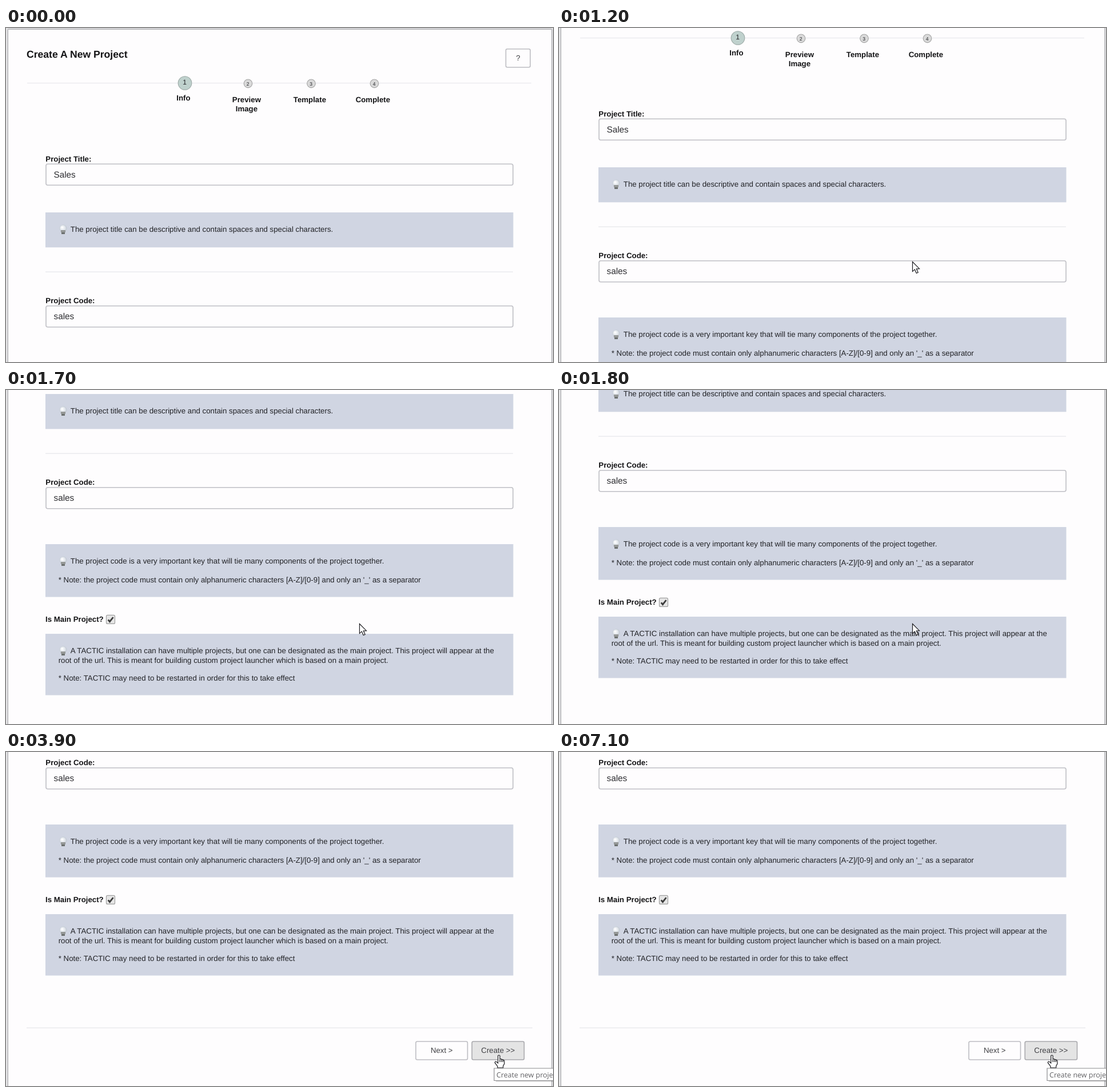
Recreate the animation shown at these times as an HTML page with a canvas. Size 957 by 585 pixels, loop 7200 ms.

```html
<!DOCTYPE html>
<html lang="en">
<head>
<meta charset="utf-8">
<title>Create A New Project</title>
<style>
  html, body { margin: 0; width: 100%; height: 100%; overflow: hidden; background: #fefdfe; }
  canvas { display: block; }
</style>
</head>
<body>
<canvas id="stage" width="957" height="585"></canvas>
<script>
const ctx = document.getElementById('stage').getContext('2d');
const W = 957, H = 585, LOOP = 7200, TICK = 100;
const SANS = '"Liberation Sans", Arial, sans-serif';
const BODY = 13.28;
const INK = '#222327', DARK = '#141416', PAPER = '#fefdfe', PANEL = '#d0d5e2', RULE = '#ebebef';

const ENTRY = { x: 936, y: 566 }, REST = { x: 618.5, y: 409.5 };
const BEND = { x: 745.5, y: 491.5 }, CREATE = { x: 862.5, y: 531 };

const span = (t, from, to) => Math.min(1, Math.max(0, (t - from) / (to - from)));
const smooth = k => k * k * (3 - 2 * k);
const easeOut = k => 1 - (1 - k) ** 2;
const mix = (a, b, k) => ({ x: a.x + (b.x - a.x) * k, y: a.y + (b.y - a.y) * k });

// Four turns of the wheel, each gliding about 115 px
function scrollAt(t) {
  const glide = (from, to, px) => px * smooth(span(t, from, to));
  return Math.round(glide(930, 1360, 115) + glide(1200, 1400, 116) +
    glide(1500, 1800, 115) + glide(1800, 2000, 113));
}

// Sweep in and rest, then a shallow curve down to the Create button
function pointerAt(t) {
  if (t < 2200) return mix(ENTRY, REST, easeOut(span(t, 100, 700)));
  const k = span(t, 2200, 3000);
  return mix(mix(REST, BEND, k), mix(BEND, CREATE, k), k);
}

function hoverAt({ x, y }) {
  if (y < 507 || y > 539) return '';
  if (x >= 815 && x <= 907) return 'create';
  return x >= 717 && x <= 808 ? 'next' : '';
}

function text(str, x, y, { size = BODY, bold = false, color = INK, align = 'left', family = SANS } = {}) {
  ctx.font = `${bold ? 'bold ' : ''}${size}px ${family}`;
  ctx.fillStyle = color;
  ctx.textAlign = align;
  ctx.fillText(str, x, y);
}

const label = (str, x, y, align) => text(str, x, y, { bold: true, color: DARK, align });

function line(x1, x2, y) {
  ctx.fillStyle = RULE;
  ctx.fillRect(x1, y - 0.75, x2 - x1, 1.5);
}

function paint(path, fill, stroke, lw) {
  ctx.fillStyle = fill;
  ctx.fill(path);
  ctx.strokeStyle = stroke;
  ctx.lineWidth = lw;
  ctx.stroke(path);
}

function box(x, y, w, h, r, fill, stroke, lw = 1.6) {
  const path = new Path2D();
  path.roundRect(x, y, w, h, r);
  paint(path, fill, stroke, lw);
}

function disc(x, y, r, fill, stroke) {
  const path = new Path2D();
  path.arc(x, y, r, 0, Math.PI * 2);
  paint(path, fill, stroke, 1.1);
}

function field(name, value, y) {
  label(name, 69.3, y - 4.6);
  box(70, y, 817, 37, 3, PAPER, '#bfbfc5');
  text(value, 83.5, y + 23.6, { size: 15.3, color: '#2e2e32' });
}

function button(str, x, y, w, hover) {
  box(x, y, w, 32, 2.5, hover ? '#e4e4e4' : PAPER, hover ? '#a9a9ad' : '#bdbdc2');
  text(str, x + w / 2, y + 20.4, { align: 'center', color: '#414145' });
}

function bulb(x, y) {
  const glass = ctx.createRadialGradient(x - 2, y - 2, 0.5, x, y, 7);
  glass.addColorStop(0, '#ffffff');
  glass.addColorStop(0.6, '#dfe4ea');
  glass.addColorStop(1, '#b6bec8');
  ctx.fillStyle = glass;
  ctx.beginPath();
  ctx.arc(x, y, 6.5, 0, Math.PI * 2);
  ctx.fill();
  ctx.fillStyle = '#959897';
  ctx.fillRect(x - 4, y + 3, 8, 4);
  ctx.fillStyle = '#6d716f';
  ctx.fillRect(x - 3, y + 7, 6, 3);
}

// The first line sits beside the bulb, each later one is placed by its drop
function panel(y, h, first, ...rest) {
  ctx.fillStyle = PANEL;
  ctx.fillRect(69, y, 818.5, h);
  bulb(100, y + 28);
  text(first, 112.8, y + 34.4);
  for (const [drop, str] of rest) text(str, 91.7, y + 34.4 + drop);
}

function stepper() {
  line(37, 919, 96.5);
  ['Info', 'Preview Image', 'Template', 'Complete'].forEach((name, i) => {
    const x = 313 + i * 110.5, on = i === 0;
    disc(x, on ? 96.5 : 97.3, on ? 11.8 : 7.3, on ? '#bfd1cd' : '#dadada', on ? '#9ca9a6' : '#a3a3a3');
    text(i + 1, x - 0.3, on ? 99.3 : 100.6, { size: on ? 12.2 : 8.6, align: 'center' });
    name.split(' ').forEach((word, j) => label(word, x - 2.6, (on ? 127 : 130) + j * 15.6, 'center'));
  });
}

function checkbox(x, y) {
  box(x, y, 15, 15, 2, '#e6e6e6', '#a0a0a0', 1.2);
  ctx.strokeStyle = '#3c3c3c';
  ctx.lineWidth = 2.8;
  ctx.stroke(new Path2D(`M${x + 3.2} ${y + 8}l2.8 3.3 6-7.7`));
}

function page(hover) {
  ctx.fillStyle = '#e6e6e8';
  ctx.fillRect(0, 0, W, 1100);
  box(3.2, 2, 951.8, 1200, 1.5, PAPER, '#bdbdc0', 1.8);

  text('Create A New Project', 36, 52.2, { size: 17.6, bold: true, color: DARK });
  button('?', 874.5, 36.7, 42.7);
  stepper();

  field('Project Title:', 'Sales', 238.3);
  panel(323, 61.3, 'The project title can be descriptive and contain spaces and special characters.');
  line(69, 887, 427.2);

  field('Project Code:', 'sales', 486.7);
  panel(586, 92.5,
    'The project code is a very important key that will tie many components of the project together.',
    [32.3, "* Note: the project code must contain only alphanumeric characters [A-Z]/[0-9] and only an '_' as a separator"]);

  label('Is Main Project?', 69, 722);
  checkbox(175.5, 710.4);
  panel(743, 107.5,
    'A TACTIC installation can have multiple projects, but one can be designated as the main project. This project will appear at the',
    [17, 'root of the url. This is meant for building custom project launcher which is based on a main project.'],
    [47.8, '* Note: TACTIC may need to be restarted in order for this to take effect']);

  line(36, 921, 942.2);
  button('Next >', 717, 966, 90.5, hover === 'next');
  button('Create >>', 815.2, 966, 91.3, hover === 'create');
}

const ARROW = new Path2D('M0 0V17L3.9 13.4 6.8 20 9.7 18.7 6.9 12.3 12 12.1Z');
const HAND = new Path2D('M-1.8 1Q0-1 1.6 1V7Q4 6 4.6 7.8 7 7 7.2 8.7 9.4 8.5 9.4 10.3V15L7.2 19V22H-2.6V19.5L-7.2 13.2Q-7 10-4.5 11.5L-1.8 14Z' +
  'M1.6 8V12M4.4 8V12M7 9V12');

function cursor(path, { x, y }) {
  ctx.save();
  ctx.translate(x, y);
  paint(path, '#fff', '#1b1b1f', 1.2);
  ctx.restore();
}

function tooltip(alpha) {
  ctx.save();
  ctx.globalAlpha = alpha;
  ctx.fillStyle = 'rgba(0, 0, 0, 0.18)';
  ctx.fillRect(857, 557, 130, 20.5);
  box(854, 554, 130, 21.5, 0, '#fff', '#8b8b8e', 1.2);
  text('Create new project', 858, 569.7,
    { size: 12.5, color: '#626265', family: '"Open Sans", "Noto Sans", sans-serif' });
  ctx.restore();
}

function draw(t) {
  const spot = pointerAt(t);
  const hover = hoverAt(spot);
  ctx.clearRect(0, 0, W, H);
  ctx.textRendering = 'geometricPrecision';
  ctx.save();
  ctx.translate(0, -scrollAt(t));
  page(t > 2200 && hover);
  ctx.restore();
  tooltip(span(t, 3200, 3500));
  if (t >= 100) cursor(t > 2200 && hover ? HAND : ARROW, spot);
}

const start = performance.now();
function tick() {
  const t = Math.max(0, performance.now() - start) % LOOP;
  draw(Math.floor(t / TICK) * TICK);
  requestAnimationFrame(tick);
}
tick();
</script>
</body>
</html>
```
